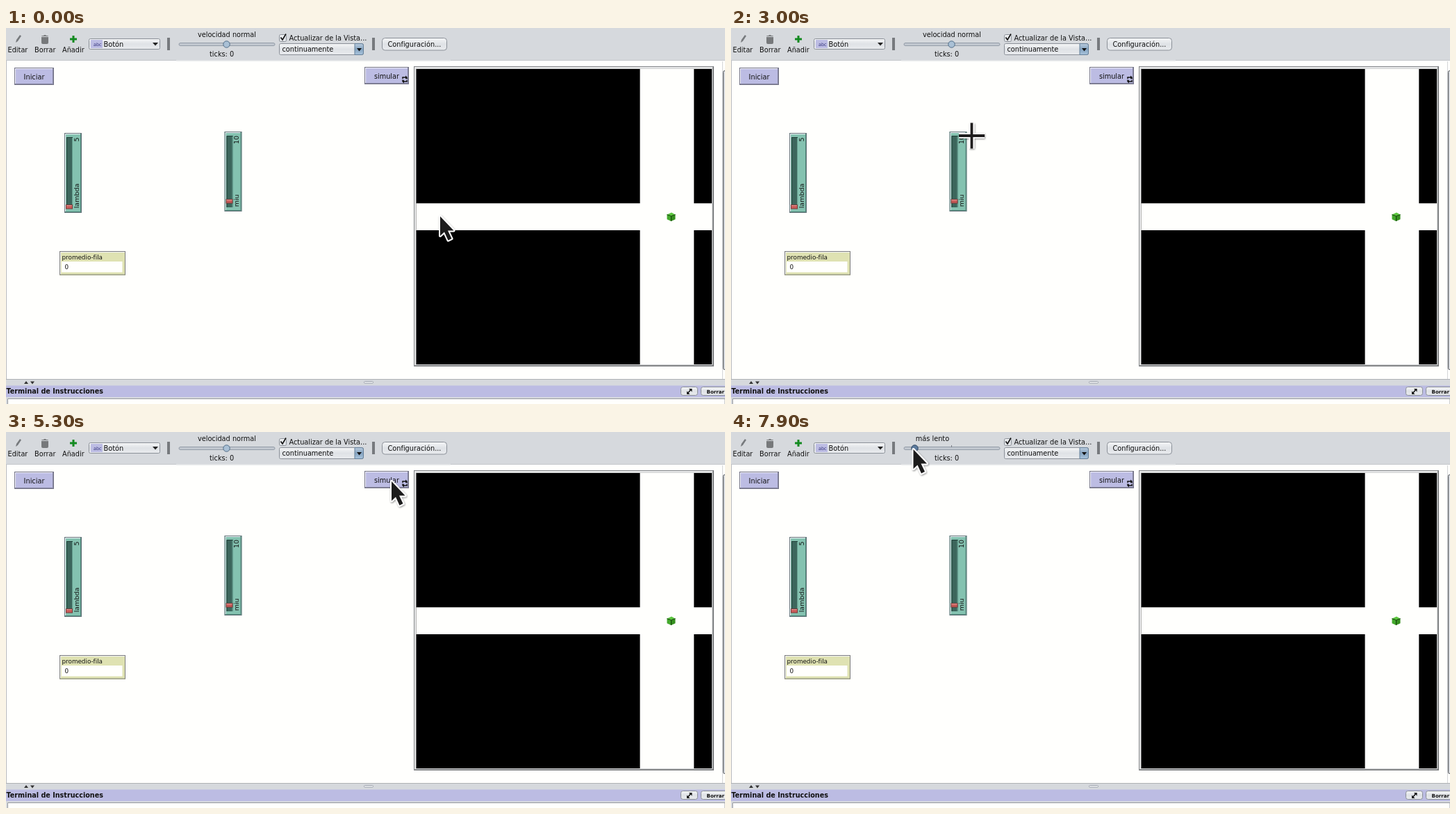
An HTML page for the animation above (8 s loop, 1035 by 541 pixels).

```html
<!DOCTYPE html>
<html lang="es">
<head>
<meta charset="utf-8">
<title>Simulación</title>
<style>
html, body { margin: 0; width: 100%; height: 100%; overflow: hidden; background: #fffffd; }
svg { display: block; width: 1035px; height: 541px; }
text { font: 9.75px "DejaVu Sans", sans-serif; fill: #111; white-space: pre; }
.small { font-size: 8.8px; }
.bold { font-weight: bold; font-size: 9.65px; }
.mid { text-anchor: middle; }
.bevel { fill: none; stroke: #5b5b68; stroke-opacity: .75; }
.shine { fill: none; stroke: #f4f4fa; }
.lilac { fill: #bcbce3; }
.paper { fill: #fffffd; }
.panel { fill: #d6d9dd; }
.field { fill: url(#metal); stroke: #8b9098; }
.cursor { fill: #1f1d1d; stroke: #fff; stroke-width: 4; paint-order: stroke; stroke-linejoin: round; filter: url(#shadow); }
</style>
</head>
<body>
<svg viewBox="0 0 1035 541">
  <defs>
    <linearGradient id="metal" x2="0" y2="1">
      <stop offset="0" stop-color="#f5f6f7"/><stop offset=".5" stop-color="#dfe2e6"/><stop offset="1" stop-color="#e9ebee"/>
    </linearGradient>
    <linearGradient id="blue" x2="0" y2="1">
      <stop offset="0" stop-color="#b9cbdd"/><stop offset=".5" stop-color="#86a4c1"/><stop offset="1" stop-color="#a9c4dc"/>
    </linearGradient>
    <filter id="shadow" x="-30%" y="-30%" width="170%" height="170%">
      <feDropShadow dx=".8" dy="1.2" stdDeviation="1" flood-opacity=".45"/>
    </filter>
  </defs>

  <rect class="paper" width="1035" height="541"/>

  <!-- toolbar -->
  <rect class="panel" width="1035" height="46.5"/>
  <path d="M0 46.5H245M640 46.5H1035" stroke="#c3c6ca"/>
  <path d="M245 47H640" stroke="#d6d9dd"/>
  <path d="M14 21l1-4 5-7 2 1.500-5 7.500z" fill="#777a7d"/>
  <path d="M51 13h10v8q0 2-2 2h-6q-2 0-2-2zM51 12q0-1 2-1h1l1-1h2l1 1h1q2 0 2 1z" fill="#77797b"/>
  <path d="M92 16H102M97 11V21" stroke="#128a20" stroke-width="3"/>
  <text x="2.500" y="34.500">Editar</text>
  <text x="41" y="34.500">Borrar</text>
  <text x="81" y="34.500">Añadir</text>
  <rect class="field" x="119.500" y="15.500" width="102" height="15" rx="2"/>
  <rect class="lilac" x="122" y="17" width="17" height="12"/>
  <text x="126" y="25.500" style="font-size:6.500px;fill:#33337c">abc</text>
  <text x="140.500" y="26.500">Botón</text>
  <path d="M211 21h8l-4 4.500z" fill="#222"/>
  <path d="M234 14V32M529 14V32" stroke="#777a7e" stroke-width="4"/>

  <text id="speed" class="mid" y="13"></text>
  <rect x="249" y="21.500" width="138" height="4" rx="2" fill="#c1c7cf" stroke="#87919e" stroke-width=".8"/>
  <path d="M317.500 19V22" stroke="#777d85"/>
  <circle id="knob" cy="23.500" r="4.700"/>
  <text x="293" y="41">ticks: 0</text>

  <rect class="field" x="393.500" y="9.500" width="10" height="10" rx="2"/>
  <path d="M395.500 13.500l2.500 3.500 5-8.500" fill="none" stroke="#111" stroke-width="1.600"/>
  <text x="407.500" y="18">Actualizar de la Vista...</text>
  <rect class="field" x="393.500" y="22.500" width="121" height="16" rx="2"/>
  <path d="M502 22.500h10q2.500 0 2.500 2.500v11q0 2.500-2.500 2.500h-10z" fill="url(#blue)" stroke="#65809a"/>
  <path d="M505 29h7l-3.500 4.500z" fill="#111"/>
  <text x="397.500" y="34">continuamente</text>
  <rect class="field" x="541.500" y="14.500" width="93" height="17.500" rx="4"/>
  <text class="mid" x="588" y="27">Configuración...</text>

  <!-- interface -->
  <path d="M.5 47V505" stroke="#b8babd"/>
  <g id="widgets"></g>
  <path d="M571 73v-2h5M577 71.500v2M577 75v2h-5M571 76.500v-2" fill="none" stroke="#111" stroke-width="1.500"/>
  <path d="M575 68.500l3 2.500-3 2.500zM573 74.500l-3 2.500 3 2.500z" fill="#111"/>

  <rect x="77" y="321" width="95" height="35" fill="#dfe2b2"/>
  <path class="shine" d="M78.500 354V322.500H171"/>
  <rect class="bevel" x="77.500" y="321.500" width="94" height="33.500"/>
  <rect class="paper" x="80" y="336" width="87.500" height="15.500"/>
  <text class="small" x="80.500" y="332.500">promedio-fila</text>
  <text class="small" x="84.500" y="346.500">0</text>

  <!-- world view -->
  <rect x="587.500" y="55.500" width="431" height="431" fill="#d4d5d6" stroke="#85878a"/>
  <path d="M589 486V57H1018" fill="none" stroke="#f8f8f8"/>
  <path d="M588 486H1018V56" fill="none" stroke="#77797b" stroke-width="1.500"/>
  <rect x="590.500" y="59" width="425.500" height="425"/>
  <path class="paper" d="M912.600 59H990.300V484H912.600ZM590.500 252.300H1016V291H590.500Z"/>
  <path d="M951.500 268.500l6 2.200v7.300l-6-2.800z" fill="#43a82c"/>
  <path d="M963.500 268.500l-6 2.200v7.300l6-2.800z" fill="#36901f"/>
  <path d="M951.500 268.500l6.500-3 5.500 3-6 2.200z" fill="#5cc53f"/>
  <path d="M951.500 268.500l6 2.200 6-2.200M957.500 270.700v7.300" fill="none" stroke="#103d08"/>
  <path d="M1031.500 48V505" stroke="#d3d5d8"/>
  <rect x="1032.500" y="61.500" width="10" height="430" rx="2" fill="#d3d6da" stroke="#55585c"/>

  <!-- command center -->
  <rect class="panel" y="505" width="1035" height="10"/>
  <path d="M0 505.500H1035" stroke="#aeb1b5"/>
  <path d="M26 512h6l-3-4zM35 508.500h6l-3 4z" fill="#333"/>
  <rect x="515.500" y="508.500" width="13" height="2.500" rx="1" fill="#f1f2f4" stroke="#9da3ad"/>
  <rect class="lilac" y="514.500" width="1035" height="16.500"/>
  <text class="bold" x=".5" y="526.300">Terminal de Instrucciones</text>
  <rect class="field" x="971.500" y="516.500" width="24" height="12" rx="3"/>
  <rect class="field" x="1000.500" y="516.500" width="40" height="12" rx="3"/>
  <path d="M981 526l5-6" stroke="#111" stroke-width="1.500"/>
  <path d="M983 519h4.500v4.500zM980 522.500v4.500h4.500z" fill="#111"/>
  <text class="bold" x="1008.500" y="525.500" style="font-size:7.100px">Borrar</text>
  <rect class="panel" y="531" width="1035" height="10"/>
  <path class="paper" d="M2.500 541V533.500H1035V541" stroke="#96999f"/>

  <path id="arrow" class="cursor" d="M1 2V30L7 24.500L12.500 36.500L17.500 34L12 22.500H20.500Z"/>
  <path id="cross" class="cursor" d="M0-18.500V18.500M-18.500 0H18.500" style="stroke-width:7.500;stroke-linejoin:miter"/>
  <path id="crossInk" d="M0-18.500V18.500M-18.500 0H18.500" stroke="#1f1d1d" stroke-width="3.800"/>
</svg>
<script>
const LOOP = 8000, STEP = 100, DRAG_START = 7000;
const $ = id => document.getElementById(id);

const button = (x, y, w, h, label) => `
  <g transform="translate(${x} ${y})">
    <rect width="${w}" height="${h}" class="lilac"/>
    <path class="shine" d="M1.5 ${h - 2}V1.5H${w - 2}"/>
    <path d="M1 ${h - 1.5}H${w - 1.5}V1" fill="none" stroke="#85859f"/>
    <rect class="bevel" x=".5" y=".5" width="${w - 1}" height="${h - 1}"/>
    <text class="mid" x="${w / 2}" y="17">${label}</text>
  </g>`;

const slider = (x, y, name, value, thumbY) => `
  <g transform="translate(${x} ${y})">
    <rect width="25" height="115" fill="#84c2b0"/>
    <path class="shine" d="M1.5 113V1.5H23"/>
    <path d="M1 113.5H23.5V1" fill="none" stroke="#4d8577"/>
    <rect class="bevel" x=".5" y=".5" width="24" height="114"/>
    <rect x="3" y="6" width="9" height="103" fill="#3c665c"/>
    <path d="M3.5 109V6.5H12" fill="none" stroke="#203f38"/>
    <path d="M11.5 7V109" stroke="#659e8f"/>
    <rect x="2.5" y="${thumbY + .5}" width="9" height="5.5" fill="#c95b59" stroke="#743a38"/>
    <path d="M3 ${thumbY + 1.5}H11" stroke="#e79a96"/>
    <text transform="translate(20.7 108.3) rotate(-90)" style="font-size:9.5px">${name}</text>
    <text class="mid" transform="translate(20.7 ${value.length > 1 ? 12 : 9.5}) rotate(-90)" style="font-size:9.5px">${value}</text>
  </g>`;

$("widgets").innerHTML =
  button(12, 57, 57, 25, "Iniciar") + button(516, 56, 64, 25, "simular") +
  slider(84, 151, "lambda", "5", 103) + slider(314.5, 149, "miu", "10", 97);

// Each move eases the pointer to a new spot; bow bends the way there vertically.
const home = { x: 624, y: 269 };
const moves = [
  { from: 100, to: 800, x: 585.5, y: 274 },
  { from: 800, to: 1000, x: 597, y: 281 },
  { from: 1000, to: 1400, x: 593, y: 267 },
  { from: 1600, to: 1900, x: 412, y: 156.5 },
  { from: 2000, to: 2500, x: 323, y: 227, bow: -40 },
  { from: 2500, to: 3000, x: 346.5, y: 155 },
  { from: 3300, to: 3500, x: 129, y: 139.5 },
  { from: 3600, to: 4100, x: 89, y: 187 },
  { from: 4100, to: 4600, x: 101, y: 149 },
  { from: 4700, to: 5300, x: 554, y: 69 },
  { from: 5700, to: 6300, x: 317.5, y: 33, bow: -10 },
  { from: 6500, to: 6800, x: 314, y: 25 },
  { from: 6900, to: 7900, x: 261.5, y: 23 }
];
const ease = k => k * k * (3 - 2 * k);

function pointerAt(t) {
  let { x, y } = home;
  for (const move of moves) {
    if (t <= move.from) break;
    const k = ease(Math.min(1, (t - move.from) / (move.to - move.from)));
    x += (move.x - x) * k;
    y += (move.y - y) * k + (move.bow || 0) * Math.sin(Math.PI * k);
  }
  return { x, y };
}

function draw(now) {
  const t = Math.floor(now % LOOP / STEP) * STEP;
  const { x, y } = pointerAt(t);
  const isArrow = x > 588 || y < 75;
  for (const id of ["arrow", "cross", "crossInk"]) {
    $(id).style.display = (id === "arrow") === isArrow ? "" : "none";
    $(id).setAttribute("transform", `translate(${x} ${y})`);
  }

  const dragging = t >= DRAG_START;
  $("knob").setAttribute("cx", dragging ? x + 3 : 317.5);
  $("knob").setAttribute("fill", dragging ? "#5d7c9f" : "#a9c0d5");
  $("knob").setAttribute("stroke", dragging ? "#263d59" : "#506c87");
  $("speed").textContent = dragging ? "más lento" : "velocidad normal";
  $("speed").setAttribute("x", dragging ? 290 : 318);
  requestAnimationFrame(draw);
}
draw(performance.now());
</script>
</body>
</html>
```
